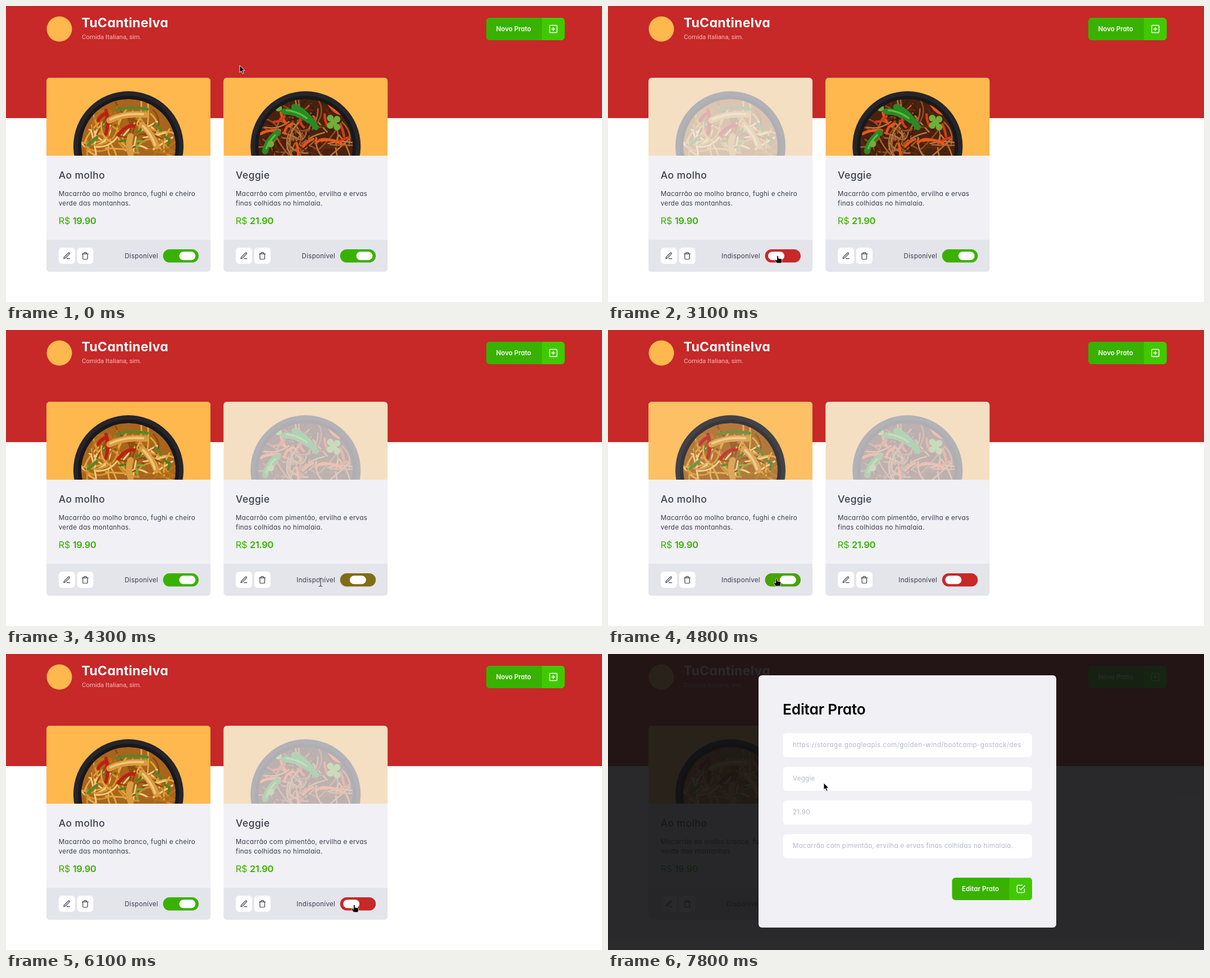
An HTML page that plays this animation: 1061x528 px, repeating every 8000 ms.

```html
<!DOCTYPE html>
<html lang="pt-BR">
<head>
<meta charset="utf-8">
<title>Cardápio</title>
<style>
  html, body { margin: 0; width: 100%; height: 100%; overflow: hidden; background: #fff; }
  svg { display: block; width: 100vw; height: 100vh; }
  text { font-family: Inter, 'Open Sans', sans-serif; font-feature-settings: "cv11"; white-space: pre; }
  .line { fill: none; stroke-linecap: round; stroke-linejoin: round; }
</style>
</head>
<body>
<svg id="stage" viewBox="0 0 1061 528"></svg>
<script>
const LOOP = 8000, STEP = 100, SWITCH_MS = 240, FADE_MS = 120;
const GREEN = [57, 177, 0], RED = [199, 40, 40];
const INK = '#3d3d4d', PALE = '#f0f0f5', HINT = '#b7b7cc';

const holds = [[0, 200], [2300, 3100], [3100, 3500], [4000, 4200], [4600, 4800], [5400, 5600],
  [5600, 5800], [6100, 6300], [6300, 6500], [6500, 6700], [7100, 7300], [7300, 7500], [7500, 7700], [7800, 8000]];

// Availability switches per card: [time, on]
const clicks = [
  [[2850, 0], [3480, 1], [4775, 0], [5580, 1]],
  [[4180, 0], [6280, 1]]
];
const MODAL_AT = 7000;

// Pointer: [time, x, y, shape]
const route = [
  [0, 416, 106, 'arrow'], [100, 416, 106, 'arrow'], [300, 424, 150, 'arrow'], [700, 250, 390, 'arrow'],
  [1000, 165, 493, 'arrow'], [1300, 230, 501, 'arrow'], [1900, 465, 455, 'arrow'], [2000, 455, 455, 'arrow'],
  [2300, 322, 446, 'hand'], [3100, 302, 445, 'hand'], [3500, 302, 446, 'hand'], [3600, 420, 447, 'arrow'],
  [3700, 545, 446, 'beam'], [3800, 600, 446, 'hand'], [4000, 625, 447, 'hand'], [4200, 625, 447, 'hand'],
  [4300, 560, 450, 'beam'], [4400, 470, 454, 'arrow'], [4600, 301, 446, 'hand'], [4800, 300, 443, 'hand'],
  [5100, 305, 470, 'arrow'], [5300, 297, 454, 'hand'], [5400, 294, 450, 'hand'], [5800, 296, 449, 'hand'],
  [5900, 390, 450, 'arrow'], [6100, 620, 447, 'hand'], [6500, 622, 447, 'hand'], [6700, 560, 446, 'beam'],
  [6800, 480, 444, 'arrow'], [6900, 421, 442, 'hand'], [7000, 422, 442, 'hand'], [7100, 439, 414, 'arrow'],
  [7300, 505, 299, 'beam'], [7500, 402, 218, 'beam'], [7700, 371, 240, 'beam'], [7800, 384, 230, 'arrow']
];

const rect = (x, y, w, h, fill, r = 0, more = '') =>
  `<rect x="${x}" y="${y}" width="${w}" height="${h}" rx="${r}" fill="${fill}" ${more}/>`;
const text = (x, y, size, fill, str, weight = 400, gap = 0.27, more = '') =>
  `<text x="${x}" y="${y}" font-size="${size}" fill="${fill}" font-weight="${weight}" letter-spacing="${gap}" ${more}>${str}</text>`;
const icon = (cx, cy, scale, color, d) =>
  `<path class="line" transform="translate(${cx} ${cy}) scale(${scale}) translate(-12 -12)" stroke="${color}" stroke-width="2" d="${d}"/>`;
const stroke = (d, color, w) => `<path class="line" d="${d}" stroke="${color}" stroke-width="${w}"/>`;

const ICONS = {
  plus: 'M5 3h14a2 2 0 0 1 2 2v14a2 2 0 0 1-2 2H5a2 2 0 0 1-2-2V5a2 2 0 0 1 2-2zM12 8v8M8 12h8',
  check: 'M9 11l3 3L22 4M21 12v7a2 2 0 0 1-2 2H5a2 2 0 0 1-2-2V5a2 2 0 0 1 2-2h11',
  pen: 'M12 20h9M16.5 3.5a2.1 2.1 0 0 1 3 3L7 19l-4 1 1-4z',
  trash: 'M3 6h18M19 6v14a2 2 0 0 1-2 2H7a2 2 0 0 1-2-2V6M8 6V4a2 2 0 0 1 2-2h4a2 2 0 0 1 2 2v2'
};

function random(seed) {
  return () => (seed = (seed * 16807) % 2147483647) / 2147483647;
}

// Curved strands scattered over the visible half of the bowl.
function strands(rnd, count, colors, width, len) {
  let out = '';
  for (let i = 0; i < count; i++) {
    const a = Math.PI * (1 + rnd()), r = 78 * Math.sqrt(rnd());
    const x = 146 + r * Math.cos(a), y = 130 + r * Math.sin(a), b = rnd() * 6.28;
    const dx = len * Math.cos(b), dy = len * Math.sin(b), k = (rnd() - .5) * 1.6;
    const f = n => n.toFixed(1);
    out += stroke(`M${f(x - dx)} ${f(y - dy)}Q${f(x - dy * k)} ${f(y + dx * k)} ${f(x + dx)} ${f(y + dy)}`,
      colors[i % colors.length], width);
  }
  return out;
}

function sauceDish() {
  const rnd = random(77);
  return strands(rnd, 70, ['#e2a63f', '#f0cd83', '#b8711c', '#d8922c', '#8c4c12'], 3, 20) +
    strands(rnd, 9, ['#4f7d1f', '#7ea536'], 4, 6) +
    stroke('M106 100Q112 78 106 58M128 102Q142 84 156 86M92 76Q98 66 106 64', '#bd1f14', 6) +
    stroke('M112 76Q140 62 176 66M170 84Q188 100 196 122M150 104Q144 118 150 136', '#d99b40', 11) +
    stroke('M114 74Q140 62 172 65M172 86Q188 102 193 120', '#efc67b', 4) +
    stroke('M124 58Q148 50 180 56M74 120L90 106M194 82L204 94', '#5b8428', 5);
}

function veggieDish() {
  const rnd = random(2024);
  return strands(rnd, 80, ['#8f4d22', '#b9773c', '#5c2a10', '#a4622f', '#3d1a0b'], 2.6, 22) +
    strands(rnd, 10, ['#e6531b', '#d23d12'], 4.5, 11) +
    stroke('M188 48Q200 66 214 64M66 100Q80 92 100 94M174 112Q194 108 210 118', '#e9571d', 5) +
    stroke('M108 60Q132 60 152 76M126 52Q146 60 164 88M74 131Q78 112 96 98', '#278a25', 11) +
    stroke('M112 58Q132 60 148 72M76 126Q80 114 92 102', '#62bd3d', 3) +
    [[190, 72], [202, 74], [190, 85], [202, 88], [196, 80], [98, 54], [84, 118]].map(([x, y]) =>
      `<circle cx="${x}" cy="${y}" r="6" fill="#6fae3c"/>`).join('');
}

function card(i, x, title, lines, price, base, dish) {
  return `<g transform="translate(${x} 128)">
    ${rect(0, 0, 292, 346, PALE, 6)}
    <g clip-path="url(#cardClip)">
      <g id="photo${i}" clip-path="url(#photoClip)">
        ${rect(0, 0, 292, 139, '#ffb84d')}
        <circle cx="146" cy="122" r="98" fill="#26252a"/>
        <circle cx="146" cy="122" r="90" fill="#19181b"/>
        <g clip-path="url(#bowlClip)"><circle cx="146" cy="122" r="84" fill="${base}"/>${dish}</g>
      </g>
      ${rect(0, 289, 292, 57, '#e4e4eb')}
    </g>
    ${text(21.8, 180, 17.5, INK, title, 500, .4)}
    ${lines.map((s, n) => text(21.8, 210.5 + n * 17, 11.6, INK, s)).join('')}
    ${text(21.5, 260.5, 16.5, '#39b100', 'R$', 400, -.4)}
    ${text(46.8, 260.5, 16.5, '#39b100', price, 600, -.4)}
    ${rect(21.8, 303, 29, 29, '#fff', 6)}${icon(36.3, 317.7, .606, INK, ICONS.pen)}
    ${rect(54.6, 303, 29, 29, '#fff', 6)}${icon(69, 317.7, .606, INK, ICONS.trash)}
    ${text(198.8, 321.5, 11.6, INK, '', 400, .27, `id="label${i}" text-anchor="end"`)}
    ${rect(207.5, 306, 63.5, 23.6, '#39b100', 11.8, `id="track${i}"`)}
    ${rect(236.3, 310.3, 29, 15, '#fff', 7.5, `id="knob${i}"`)}
  </g>`;
}

const button = (x, y, w, label, glyph) =>
  rect(x, y, w, 40, '#39b100', 6) +
  `<path d="M${x + w - 40.5} ${y}h34.5a6 6 0 0 1 6 6v28a6 6 0 0 1-6 6h-34.5z" fill="#41c900"/>` +
  text(x + 17.5, y + 23.6, 11.6, '#fff', label, 600, 0) +
  icon(x + w - 20.2, y + 20, .727, '#fff', glyph);

const fields = ['https://storage.googleapis.com/golden-wind/bootcamp-gostack/des', 'Veggie', '21.90',
  'Macarrão com pimentão, ervilha e ervas finas colhidas no himalaia.'];

const stage = document.getElementById('stage');
stage.innerHTML = `
  <defs>
    <clipPath id="cardClip"><rect width="292" height="346" rx="6"/></clipPath>
    <clipPath id="photoClip"><rect width="292" height="139"/></clipPath>
    <clipPath id="bowlClip"><circle cx="146" cy="122" r="84"/></clipPath>
    <clipPath id="fieldClip"><rect x="328" y="141" width="410" height="230"/></clipPath>
  </defs>
  ${rect(0, 0, 1061, 528, '#fff')}
  ${rect(0, 0, 1061, 200, '#c72828')}
  <circle cx="95" cy="41" r="22.5" fill="#ffb84d"/>
  ${text(134.5, 38.3, 23, '#fff', 'TuCantinelva', 700, .3)}
  ${text(135, 59, 11.4, '#f3bcbc', 'Comida Italiana, sim.', 400, 0, 'style="font-family:Roboto,sans-serif"')}
  ${button(855, 21, 139.5, 'Novo Prato', ICONS.plus)}
  ${card(0, 72, 'Ao molho', ['Macarrão ao molho branco, fughi e cheiro', 'verde das montanhas.'], '19.90', '#a9651c', sauceDish())}
  ${card(1, 387.3, 'Veggie', ['Macarrão com pimentão, ervilha e ervas', 'finas colhidas no himalaia.'], '21.90', '#4a210e', veggieDish())}
  <g id="modal">
    ${rect(0, 0, 1061, 528, '#121214', 0, 'fill-opacity=".9"')}
    ${rect(268, 38, 530, 450, PALE, 6)}
    ${text(311, 108.3, 26.2, '#000', 'Editar Prato', 600, -.15)}
    ${fields.map((_, i) => rect(311.5, 141 + i * 60.1, 443.5, 43, '#fff', 6)).join('')}
    <g clip-path="url(#fieldClip)">
      ${fields.map((s, i) => text(329, 165.8 + i * 60.1, 11.6, HINT, s, 400, i ? .27 : .44)).join('')}
    </g>
    ${button(612.5, 399, 142.5, 'Editar Prato', ICONS.check)}
  </g>
  <g id="pointer" stroke-linejoin="round">
    <path id="arrow" d="M0 0v12.4l2.9-2.6 2.1 4.8 2.2-1-2.1-4.6h4z" fill="#000" stroke="#fff" stroke-width=".9"/>
    <path id="hand" d="M-1.3 1q1.3-1.6 2.6 0v4l5 .8q1.2.5 1.2 2v3l-1 3H-1l-4-5q-.5-1.6 1-1.6l2.7 1.3z" fill="#000" stroke="#fff" stroke-width=".8"/>
    <g id="beam" class="line"><path d="M-3-7.3q2.6 0 3 1 .4-1 3-1M0-6.3V6.3M-3 7.3q2.6 0 3-1 .4 1 3 1" stroke="#fff" stroke-width="2.4"/>
      <path d="M-3-7.3q2.6 0 3 1 .4-1 3-1M0-6.3V6.3M-3 7.3q2.6 0 3-1 .4 1 3 1" stroke="#222" stroke-width="1.1"/></g>
  </g>`;

const $ = id => document.getElementById(id);
const mix = (a, b, k) => a + (b - a) * k;
const ramp = (t, start, dur) => Math.min(1, Math.max(0, (t - start) / dur));

function drawCard(i, t) {
  const [at, on] = clicks[i].filter(c => c[0] <= t).pop() || [-LOOP, 1];
  const level = dur => on ? ramp(t, at, dur) : 1 - ramp(t, at, dur);
  const k = level(SWITCH_MS);
  $('photo' + i).setAttribute('opacity', mix(.3, 1, level(FADE_MS)));
  $('knob' + i).setAttribute('x', mix(213, 236.3, k));
  $('track' + i).setAttribute('fill', `rgb(${RED.map((c, n) => Math.round(mix(c, GREEN[n], k)))})`);
  $('label' + i).textContent = on ? 'Disponível' : 'Indisponível';
}

function drawPointer(t) {
  let n = route.length - 1;
  while (route[n][0] > t) n--;
  const a = route[n], b = route[n + 1] || a;
  const k = a === b ? 0 : (t - a[0]) / (b[0] - a[0]);
  $('pointer').setAttribute('transform', `translate(${mix(a[1], b[1], k)} ${mix(a[2], b[2], k)})`);
  for (const shape of ['arrow', 'hand', 'beam']) $(shape).style.display = shape === a[3] ? '' : 'none';
}

function draw(ms) {
  let t = Math.floor(ms % LOOP / STEP) * STEP;
  const hold = holds.find(([from, to]) => t >= from && t < to);
  if (hold) t = hold[0];
  drawCard(0, t);
  drawCard(1, t);
  $('modal').style.display = t >= MODAL_AT ? '' : 'none';
  drawPointer(t);
}

const start = performance.now();
function tick() {
  draw(performance.now() - start);
  requestAnimationFrame(tick);
}
tick();
</script>
</body>
</html>
```
